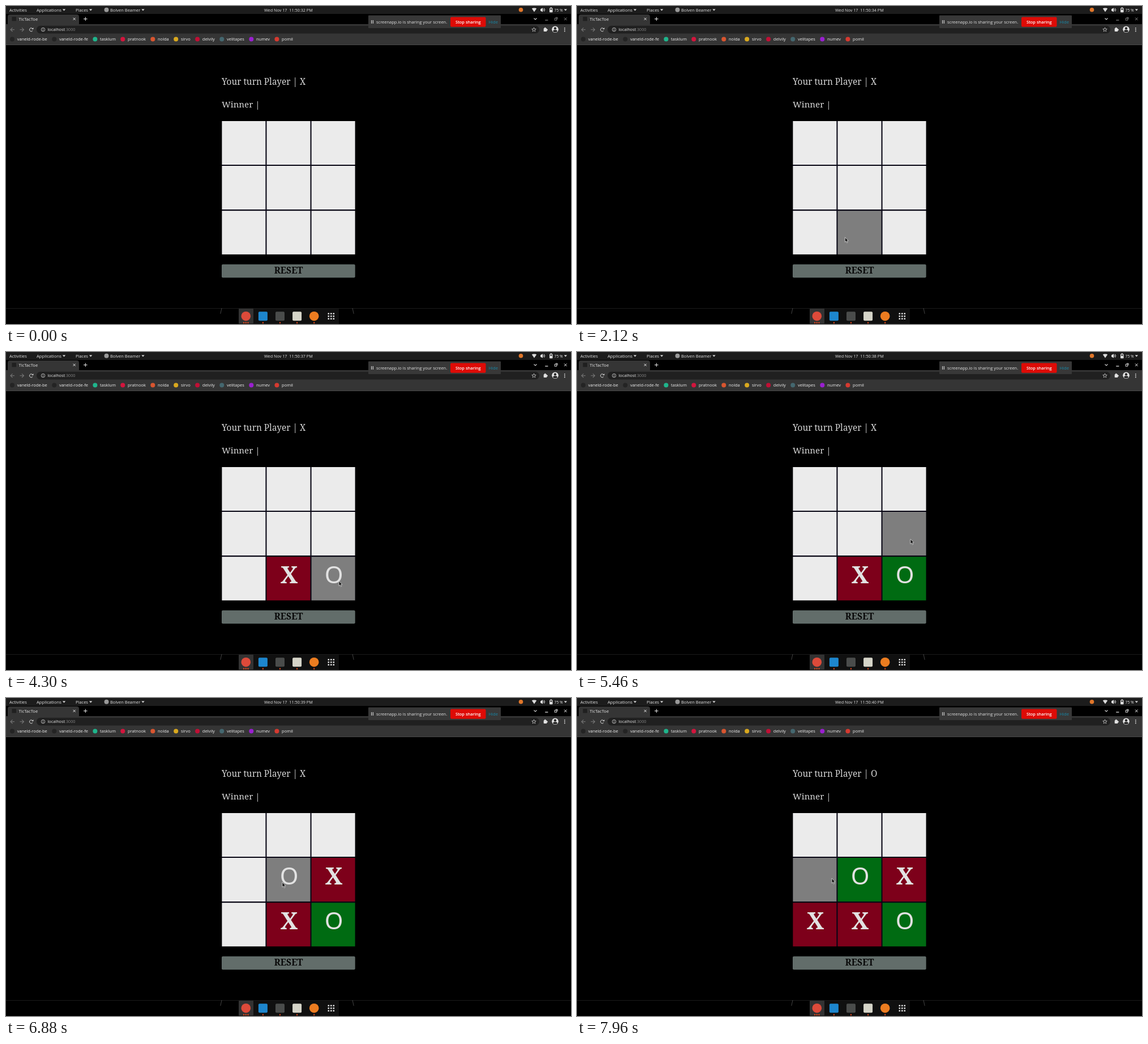
Recreate the animation shown at these times as an HTML page with a canvas. Size 998 by 561 pixels, loop 7.99 s.

```html
<!DOCTYPE html>
<html lang="en">
<head>
<meta charset="utf-8">
<title>TicTacToe</title>
<style>
  html, body { margin: 0; width: 100%; height: 100%; overflow: hidden; background: #000; }
  canvas { display: block; width: 998px; height: 561px; }
</style>
</head>
<body>
<canvas id="stage" width="998" height="561"></canvas>
<script>
const ctx = document.getElementById('stage').getContext('2d');
const LOOP = 7990;
const UI = '"Open Sans", "Noto Sans", sans-serif';
const SLAB = '"Noto Serif", serif';
const MEDIUM = { weight: 500 };

// Pointer stops, eased in between
const STOPS = [
  { t: 760, x: -8, y: 432 }, { t: 1380, x: 249, y: 380 }, { t: 2300, x: 498, y: 411 },
  { t: 2970, x: 559, y: 412 }, { t: 4300, x: 588, y: 404 }, { t: 5460, x: 589, y: 330 },
  { t: 6880, x: 488, y: 325 }, { t: 7420, x: 424, y: 396 }, { t: 7960, x: 450, y: 318 }
];
// Each click marks the cell under the pointer, X and O in turn
const CLICKS = [2420, 3700, 5660, 6480, 7420];
const FIRST_TICK = 150;

const GRID = { x: 381.4, y: 203, pitch: 79.1, size: 77 };
const MARKS = {
  X: { color: '#7d001a', weight: 600, font: SLAB },
  O: { color: '#006b12', weight: 400, font: '"Noto Sans", sans-serif' }
};

const BOOKMARKS = {
  'vaneld-rode-be': '#242424', 'vaneld-rode-fe': '#242424', tasklum: '#1fb58c',
  pratnook: '#d3153d', nolda: '#d8552f', sirvo: '#d9a81e', delvily: '#c00f35',
  velitapes: '#44676f', numev: '#9a1fd0', pomil: '#d63a30'
};
const DOCK = ['#dd4a3a', '#1d86cd', '#4a4c4b', '#d5d4c8', '#ec7c20'];

function rect(x, y, w, h, color, r = 0) {
  ctx.fillStyle = color;
  ctx.beginPath();
  ctx.roundRect(x, y, w, h, r);
  ctx.fill();
}

function dot(x, y, r, color) {
  ctx.fillStyle = color;
  ctx.beginPath();
  ctx.arc(x, y, r, 0, Math.PI * 2);
  ctx.fill();
}

function trace(points) {
  ctx.beginPath();
  points.forEach(([x, y]) => ctx.lineTo(x, y));
}

function poly(points, color) {
  trace(points);
  ctx.fillStyle = color;
  ctx.fill();
}

function line(color, width, ...points) {
  trace(points);
  ctx.lineWidth = width;
  ctx.strokeStyle = color;
  ctx.stroke();
}

function ring(x, y, r, color, from = 0, to = Math.PI * 2) {
  ctx.lineWidth = 1;
  ctx.strokeStyle = color;
  ctx.beginPath();
  ctx.arc(x, y, r, from, to);
  ctx.stroke();
}

function text(str, x, y, size, color, { weight = 400, font = UI, align = 'left' } = {}) {
  ctx.font = `${weight} ${size}px ${font}`;
  ctx.textAlign = align;
  ctx.fillStyle = color;
  ctx.fillText(str, x, y);
  return ctx.measureText(str).width;
}

function cross(x, y, r, color) {
  line(color, 1, [x - r, y - r], [x + r, y + r]);
  line(color, 1, [x + r, y - r], [x - r, y + r]);
}

function arrow(x, dir, color) {
  const tip = x + 3.5 * dir;
  line(color, 1.1, [x - 3.5 * dir, 41.7], [tip, 41.7]);
  line(color, 1.1, [x, 38.4], [tip, 41.7], [x, 45]);
}

const caret = x => poly([[x, 5.4], [x + 5.4, 5.4], [x + 2.7, 8.6]], '#ddd');

function menu(label, x, size = 7.5) {
  caret(x + text(label, x, 9.7, size, '#e2e2e2', MEDIUM) + 2);
}

function drawTopBar(t) {
  rect(0, 0, 998, 14, '#1c1c1c');
  text('Activities', 6, 9.7, 7.5, '#e2e2e2', MEDIUM);
  menu('Applications', 54, 7.7);
  menu('Places', 123);
  dot(177.5, 6.8, 4, '#999');
  menu('Bolven Beamer', 184);

  const second = 33 + Math.floor((t - FIRST_TICK) / 1000);
  text(`Wed Nov 17  11:50:${second} PM`, 456, 9.7, 7.25, '#e2e2e2', MEDIUM);

  dot(909.5, 6.8, 3.8, '#e0762a');
  poly([[928.8, 4.6], [931, 3.5], [935, 3.5], [937.2, 4.6], [933, 10.4]], '#ddd');
  poly([[944, 5.4], [948, 3.2], [948, 10.4], [944, 8.4]], '#ddd');
  for (const r of [2.2, 4]) ring(947.5, 6.8, r, '#ddd', -0.9, 0.9);
  rect(960, 3.4, 5.6, 7.8, '#ddd', 1);
  rect(961.5, 2.4, 2.6, 1.4, '#ddd');
  rect(961.2, 4.6, 3.2, 2, '#222');
  menu('75 %', 968.5, 6.8);
}

function drawTabs(focused) {
  rect(0, 14, 998, 18, '#000');
  rect(3, 15, 126, 20, '#353535', 4);
  rect(10.5, 19, 7.5, 7.5, '#202020');
  text('TicTacToe', 22.5, 25.5, 7.6, '#e8e8e8', MEDIUM);
  cross(120.6, 22.8, 2, '#eee');
  line('#ddd', 1.1, [137, 22.8], [143.6, 22.8]);
  line('#ddd', 1.1, [140.3, 19.5], [140.3, 26.1]);

  const tone = focused ? '#eee' : '#858585';
  line('#ccc', 1.1, [932.5, 21.5], [935, 24], [937.5, 21.5]);
  line(tone, 1.2, [952.2, 25], [957.4, 25]);
  ctx.lineWidth = 0.9;
  ctx.strokeRect(969.2, 21.7, 3.4, 3.4);
  line(tone, 0.9, [970.7, 20.2], [974.1, 20.2], [974.1, 23.6]);
  cross(988.3, 22.8, 2.3, tone);
}

function drawBookmarks() {
  let x = 11;
  for (const [name, color] of Object.entries(BOOKMARKS)) {
    dot(x, 58.6, 4, color);
    x += 8.7 + text(name, x + 8.7, 61.4, 7.5, '#eee', MEDIUM) + 12.4;
  }
}

function drawToolbar() {
  rect(0, 32, 998, 37, '#353535');
  arrow(11.5, -1, '#777');
  arrow(28, 1, '#777');
  ring(44.5, 41.8, 3, '#ddd', 0.5, 5.4);
  poly([[45.3, 41], [48.4, 41], [48.4, 37.9]], '#ddd');

  rect(54, 34.8, 888, 13.6, '#202020', 6.8);
  ring(65.5, 41.6, 3.2, '#bbb');
  rect(65, 41.2, 1, 2.4, '#bbb');
  rect(65, 39.5, 1, 1, '#bbb');
  const host = text('localhost', 73.5, 44.4, 7.3, '#e8e8e8');
  text(':3000', 73.5 + host, 44.4, 7.2, '#858585');

  const star = Array.from({ length: 11 }, (_, i) => {
    const a = i * Math.PI / 5 - Math.PI / 2, r = i % 2 ? 1.7 : 3.9;
    return [932.5 + r * Math.cos(a), 41.8 + r * Math.sin(a)];
  });
  line('#ccc', 0.8, ...star);

  rect(949.7, 39.3, 5.6, 5.8, '#e2e2e2', 0.8);
  dot(952.3, 39, 1.3, '#e2e2e2');
  dot(955.6, 42, 1.3, '#e2e2e2');

  dot(970, 41.3, 5.8, '#e4e4e4');
  dot(970, 39.4, 2.2, '#262626');
  rect(966.4, 42.2, 7.2, 4, '#262626', 2);
  for (let i = 0; i < 3; i++) dot(986.8, 38.9 + i * 2.8, 0.9, '#ddd');

  drawBookmarks();
  rect(0, 68, 998, 1, '#484848');
}

function drawSharing() {
  rect(640, 16.5, 234, 22.5, '#383838', 1);
  for (const x of [645, 647.8]) rect(x, 25, 1.2, 6, '#ccc');
  text('screenapp.io is sharing your screen.', 654, 30.7, 7.5, '#e2e2e2');
  rect(785, 19.5, 62.5, 17.3, '#de0b06', 2);
  text('Stop sharing', 816.2, 30.7, 7.4, '#fff', { weight: 600, align: 'center' });
  text('Hide', 852.5, 30.7, 7.6, '#1688a8', MEDIUM);
}

function drawDock() {
  rect(0, 533, 998, 0.8, '#242424');
  rect(411, 534, 177, 27, '#101010');
  line('#555', 0.8, [381, 533], [378.8, 543]);
  line('#555', 0.8, [612, 533], [614.2, 543]);
  rect(411, 534, 26, 26, '#333', 1);

  DOCK.forEach((color, i) => {
    const x = 423.8 + i * 30.1;
    if (i % 4) rect(x - 8, 539.2, 16, 16, color, 2);
    else dot(x, 547.2, 8.3, color);
    dot(x, 558.7, 1.2, '#e8481c');
  });
  for (const side of [-3.7, 3.7]) dot(423.8 + side, 558.7, 1.2, '#e8481c');
  for (let i = 0; i < 9; i++) {
    rect(568.5 + i % 3 * 4.5, 541.5 + Math.floor(i / 3) * 4.5, 2.6, 2.6, '#e4e4e4', 0.6);
  }
}

function pointerAt(t) {
  const next = STOPS.findIndex(s => s.t > t);
  if (next < 0) return STOPS[STOPS.length - 1];
  if (next === 0) return STOPS[0];
  const a = STOPS[next - 1], b = STOPS[next];
  const u = (t - a.t) / (b.t - a.t), k = u * u * (3 - 2 * u);
  return { x: a.x + (b.x - a.x) * k, y: a.y + (b.y - a.y) * k };
}

function cellAt({ x, y }) {
  const col = Math.floor((x - GRID.x) / GRID.pitch);
  const row = Math.floor((y - GRID.y) / GRID.pitch);
  return col >= 0 && col < 3 && row >= 0 && row < 3 ? row * 3 + col : -1;
}

function boardAt(t) {
  const board = [];
  CLICKS.filter(c => c <= t).forEach((c, i) => { board[cellAt(pointerAt(c))] = 'XO'[i % 2]; });
  return board;
}

function drawGame(t, pointer) {
  const turn = 'XO'[CLICKS.filter(c => c <= t).length % 2];
  const heading = { weight: 300, font: SLAB };
  text(`Your turn Player | ${turn}`, 381, 138.6, 15.4, '#d6d6d6', heading);
  text('Winner |', 381, 178.6, 15.1, '#d6d6d6', heading);

  const board = boardAt(t), hovered = cellAt(pointer);
  rect(GRID.x, GRID.y, 235.2, 235, '#080614');
  for (let i = 0; i < 9; i++) {
    const x = GRID.x + i % 3 * GRID.pitch, y = GRID.y + Math.floor(i / 3) * GRID.pitch;
    const mark = MARKS[board[i]];
    rect(x, y, GRID.size, GRID.size, i === hovered ? '#7e7e7e' : mark ? mark.color : '#ebebeb');
    if (mark) text(board[i], x + 39.6, y + 47.2, 42, '#e2e2e2', { ...mark, align: 'center' });
  }
  rect(381, 455.7, 235.7, 23.6, '#626d6a', 2);
  text('RESET', 499.2, 472, 15.6, '#080808', { weight: 600, font: SLAB, align: 'center' });
}

function drawPointer({ x, y }) {
  const shape = [[0, 0], [0, 8.6], [2, 6.9], [3.4, 10], [4.8, 9.3], [3.5, 6.4], [5.9, 6.2], [0, 0]]
    .map(([dx, dy]) => [x + dx, y + dy]);
  poly(shape, '#151515');
  line('#ddd', 0.8, ...shape);
}

function draw(t) {
  const pointer = pointerAt(t);
  rect(0, 0, 998, 561, '#000');
  drawTopBar(t);
  drawTabs(t >= CLICKS[0]);
  drawToolbar();
  drawSharing();
  drawGame(t, pointer);
  drawDock();
  drawPointer(pointer);
}

const start = performance.now();
function tick() {
  draw((performance.now() - start) % LOOP);
  requestAnimationFrame(tick);
}
tick();
</script>
</body>
</html>
```
